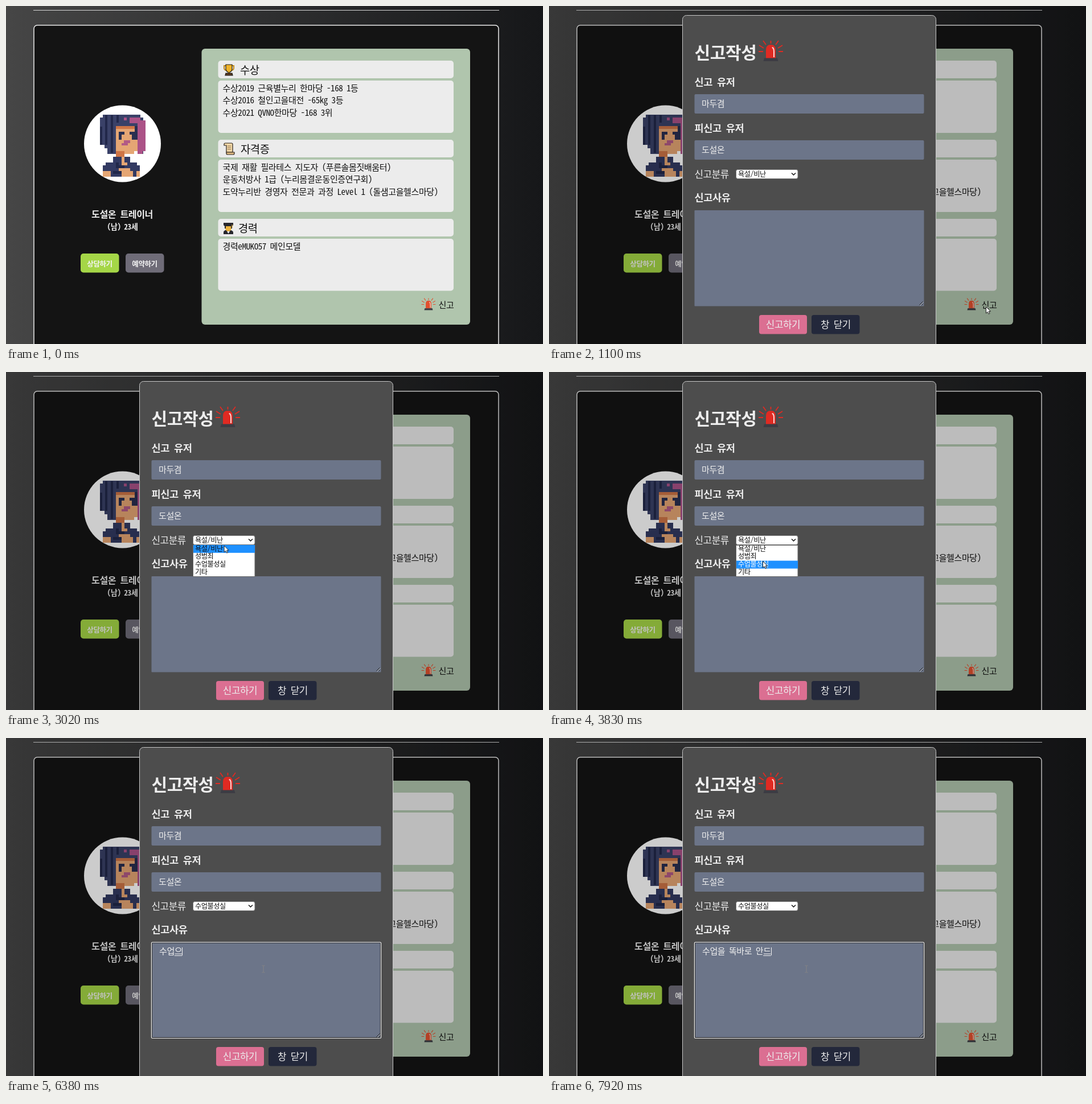
An HTML page that plays this animation: 943 px wide and 594 px high, repeating every 8000 ms.

```html
<!DOCTYPE html>
<html lang="ko">
<head>
<meta charset="utf-8">
<title>신고작성</title>
<style>
html, body { margin: 0; width: 100%; height: 100%; overflow: hidden; background: #222; }
#stage {
  position: relative; width: 943px; height: 594px; overflow: hidden;
  background: linear-gradient(to right, #464646, #161719);
  font-family: "Noto Sans Mono CJK KR", "Noto Sans CJK KR", "Noto Sans CJK JP", monospace;
  letter-spacing: -.027em; word-spacing: -.027em;
}
svg { position: absolute; left: 0; top: 0; }
text { white-space: pre; font-weight: 700; }
.head { font-size: 18.8px; fill: #111; }
.list { font-size: 15.05px; fill: #111; }
.head, .list text { font-weight: 500; }
.btn { font-size: 12.5px; fill: #f4f4f4; text-anchor: middle; }
.label { font-size: 17.6px; fill: #ededed; }
.big { font-size: 16.9px; fill: #ededed; font-weight: 500; }
.field { font-size: 15.05px; fill: #ededed; font-weight: 400; }
.opt { font-size: 12.2px; fill: #111; }
.opt, .opt text { font-weight: 500; }

/* 8 s loop: 1% = 80 ms */
.cut { animation: 8s step-end infinite; }
#modal { animation-name: modal; }
#report { animation-name: hover; }
#ring { animation-name: ring; }
#menu { animation-name: menu; }
#mark { animation-name: mark; }
#lazy { animation-name: lit; }
#pick1 { animation-name: first; }
#pick2 { animation-name: second; }
#focus { animation-name: focus; }
#arrow { animation-name: arrow; }
#hand { animation-name: hand; }
#beam { animation-name: beam; }
#caret { animation-name: blink; }
#pointer { animation: move 8s linear infinite; }

@keyframes modal { 0% { visibility: hidden } 13.75%, 100% { visibility: visible } }
@keyframes hover { 0% { opacity: 1 } 8.1% { opacity: .5 } 13.75%, 100% { opacity: 1 } }
@keyframes ring {
  0% { visibility: hidden } 12.125% { visibility: visible } 13.75% { visibility: hidden }
  32.6% { visibility: visible } 33.7% { visibility: hidden }
  51.25% { visibility: visible } 52.1% { visibility: hidden }
  56.1% { visibility: visible } 57%, 100% { visibility: hidden }
}
@keyframes menu { 0% { visibility: hidden } 34.375% { visibility: visible } 51.25%, 100% { visibility: hidden } }
@keyframes mark {
  0% { transform: translateY(0) } 39.5% { transform: translateY(13.8px) }
  46.2%, 100% { transform: translateY(27.6px) }
}
@keyframes lit { 0% { fill: #111 } 46.2%, 100% { fill: #fff } }
@keyframes first { 0% { opacity: 1 } 51.25%, 100% { opacity: 0 } }
@keyframes second { 0% { opacity: 0 } 51.25%, 100% { opacity: 1 } }
@keyframes focus { 0% { visibility: hidden } 56.125%, 100% { visibility: visible } }
@keyframes arrow {
  0% { visibility: hidden } 1.8% { visibility: visible } 8.1% { visibility: hidden }
  13.75% { visibility: visible } 54.2%, 100% { visibility: hidden }
}
@keyframes hand { 0% { visibility: hidden } 8.1% { visibility: visible } 13.75%, 100% { visibility: hidden } }
@keyframes beam { 0% { visibility: visible } 1.8% { visibility: hidden } 54.2%, 100% { visibility: visible } }
@keyframes blink {
  0% { visibility: hidden } 56.125% { visibility: visible } 62.375% { visibility: hidden }
  69%, 100% { visibility: visible }
}
@keyframes move {
  0%, .8% { transform: translate(389px, 307px); animation-timing-function: ease-in-out }
  8.75%, 16.2% { transform: translate(767px, 528px); animation-timing-function: ease-in-out }
  23.6% { transform: translate(343px, 241px) }
  25.9%, 26.6% { transform: translate(366px, 274px) }
  27.6%, 29.2% { transform: translate(380px, 306px) }
  32%, 34.2% { transform: translate(383px, 297px) }
  35.25%, 37.5% { transform: translate(383px, 303px) }
  40.4%, 44.3% { transform: translate(378px, 321px) }
  47.6%, 51.25% { transform: translate(375px, 332px); animation-timing-function: ease-in-out }
  56.1%, 100% { transform: translate(452px, 406px) }
}

#typed {
  position: absolute; left: 269px; top: 366px; line-height: 16px;
  font-size: 15.05px; color: #f0f0f0; white-space: pre;
}
#typed u { text-decoration: underline 1px; text-underline-offset: 2px; }
#caret { position: absolute; left: 100%; top: 2px; width: 1px; height: 14px; background: #f4f4f4; }
</style>
</head>
<body>
<div id="stage">
<svg width="943" height="594" viewBox="0 0 943 594">
  <defs>
    <symbol id="siren" viewBox="0 0 43 38" overflow="visible">
      <path d="M13 32V17Q13 8 21.500 8T30 17V32Z" fill="currentColor"/>
      <path d="M25 12q3 2 3 8v10h-2V20q0-5-3-7z" fill="#fff" opacity=".8"/>
      <path d="M10 31.500H33L34.500 37H8.500Z" fill="#3c3c44"/>
      <path d="M21.500 6V1M13 8 8 1M30 8l5-7M9 14 1 9M34 14l8-5M8 20H0M35 20h8" fill="none" stroke="currentColor" stroke-width="1.800"/>
    </symbol>
    <clipPath id="round"><circle cx="204.500" cy="242" r="67.500"/></clipPath>
  </defs>

  <path d="M48 7.500H866" stroke="#d6d6d6"/>
  <rect x="49" y="33.700" width="816" height="600" rx="6" fill="#141414" stroke="#ececec" stroke-width="1.500"/>

  <!-- profile -->
  <circle cx="204.500" cy="242" r="67.500" fill="#fff"/>
  <g clip-path="url(#round)" shape-rendering="crispEdges">
    <path d="M170 191H236V196H241V260H231V211H193V260H178V250H173V244H165V196H170Z" fill="#3a4168"/>
    <path d="M174 192h4v52h-4zM184 192h4v66h-4zM194 192h4v13h-4zM165 212h4v32h-4z" fill="#22284a"/>
    <path d="M193 211H231V255H225V260H208V270H193Z" fill="#e5a674"/>
    <path d="M193 211H226V216H193ZM193 255H208V265H193Z" fill="#cf7546"/>
    <path d="M207 196h5v5h-5zM217 196h19v5h9v54h-5v5h-9v-54h-14z" fill="#ab5287"/>
    <path d="M198 221h10v5h-5v9h-5zM217 221h9v-10h5v24h-10v-9h-4z" fill="#2a2f50"/>
    <path d="M207 236h11v5h-4v4h-11v-4h4z" fill="#b25a85"/>
    <path d="M188 265h15v5h5v-5h10v10h12v5h5v20h-65v-20h5v-5h13z" fill="#333a62"/>
    <path d="M203 265h5v10h5v5h-10zM170 290h14v10h-14zM198 285h20v5h5v10h-20v-5h-5zM229 290h6v10h-6z" fill="#e5a674"/>
    <path d="M193 275h5v5h10v5h-15zM188 290h15v5h-15z" fill="#22284a"/>
  </g>
  <text x="204" y="372" font-size="16.100" fill="#efefef" text-anchor="middle">도설온 트레이너</text>
  <text x="204.500" y="392.500" font-size="13.200" fill="#efefef" text-anchor="middle">(남) 23세</text>
  <rect x="131" y="435" width="67.500" height="33.500" rx="5" fill="#a5d647"/>
  <rect x="210" y="435" width="67.500" height="33.500" rx="5" fill="#6f6c78"/>
  <text class="btn" x="164.500" y="457.500">상담하기</text>
  <text class="btn" x="243.500" y="457.500">예약하기</text>

  <!-- record panel -->
  <rect x="343.500" y="75" width="471.500" height="485" rx="6" fill="#b0c5ad"/>
  <g fill="#ececec">
    <rect x="372.500" y="96" width="413.500" height="31" rx="5"/>
    <rect x="372.500" y="131" width="413.500" height="92" rx="5"/>
    <rect x="372.500" y="235" width="413.500" height="31" rx="5"/>
    <rect x="372.500" y="270" width="413.500" height="92" rx="5"/>
    <rect x="372.500" y="374" width="413.500" height="31" rx="5"/>
    <rect x="372.500" y="409" width="413.500" height="91.500" rx="5"/>
  </g>
  <g id="trophy" stroke="#1c1a18" stroke-width="1.200">
    <path d="M386 105h-3v4q0 4 5 4M397 105h3v4q0 4-5 4" fill="none" stroke="#c08a1c" stroke-width="2"/>
    <path d="M386 103h11v7q0 5-4 6v2h-3v-2q-4-1-4-6z" fill="#f0b429"/>
    <path d="M386 118h11l1 4h-13z" fill="#5a3a22"/>
  </g>
  <g id="scroll" stroke="#2a2119" stroke-width="1.200">
    <path d="M383 243q0-2 2-2h11q2 0 2 2v14h-11v-12h-4z" fill="#f2d9a8"/>
    <path d="M387 257h14v2q0 2-2 2h-10q-2 0-2-2z" fill="#e2bd84"/>
    <path d="M389 246h6M389 249h6M389 252h6" stroke="#8a6b48"/>
  </g>
  <g id="graduate">
    <path d="M382 401v-4q2-4 8-4t9 4v4z" fill="#26262c"/>
    <path d="M385 386h11v5q-1 5-5.500 5t-5.500-5z" fill="#eeb43c"/>
    <path d="M382 381h17v4l-2 2v4h-2v-4h-9v4h-2v-4l-2-2z" fill="#26262c"/>
    <path d="M388 396h5l-2.500 4z" fill="#eee"/>
    <path d="M397 384v6" stroke="#e0a82c"/>
  </g>
  <text class="head" x="411" y="120">수상</text>
  <text class="head" x="412" y="258.500">자격증</text>
  <text class="head" x="408" y="397.500">경력</text>
  <g class="list">
    <text x="380.500" y="149.500">수상2019 근육별누리 한마당 -168 1등</text>
    <text x="380.500" y="171">수상2016 철인고을대전 -65kg 3등</text>
    <text x="380.500" y="192.500">수상2021 QVNO한마당 -168 3위</text>
    <text x="380.500" y="288.500">국제 재활 필라테스 지도자 (푸른솔몸짓배움터)</text>
    <text x="380.500" y="310">운동처방사 1급 (누리몸결운동인증연구회)</text>
    <text x="380.500" y="331.500">도약누리반 경영자 전문과 과정 Level 1 (돌샘고을헬스마당)</text>
    <text x="380.500" y="428">경력eMUKO57 메인모델</text>
    <g id="report" class="cut"><text x="759.500" y="530.500">신고</text></g>
  </g>
  <use href="#siren" x="728" y="513" width="28" height="22" color="#e2502f"/>

  <!-- report dialog -->
  <g id="modal" class="cut">
    <rect width="943" height="594" fill="#000" opacity=".2"/>
    <rect x="234.500" y="16.500" width="445" height="620" rx="7" fill="#4d4d4d" stroke="#c8c8c8"/>
    <text x="255.500" y="92.500" font-size="30.100" fill="#ededed">신고작성</text>
    <use href="#siren" x="368" y="60" width="43" height="38" color="#e02a22"/>
    <text class="label" x="255.500" y="139.500">신고 유저</text>
    <text class="label" x="255.500" y="220.500">피신고 유저</text>
    <text class="big" x="255.500" y="302">신고분류</text>
    <text class="label" x="255.500" y="342.500">신고사유</text>
    <g fill="#6c7589">
      <rect x="255.500" y="155" width="403" height="34" rx="2"/>
      <rect x="255.500" y="236" width="403" height="34" rx="2"/>
      <rect x="255.500" y="359" width="403" height="168.500" rx="1"/>
    </g>
    <path d="M650.500 525.500l6-6M654.500 525.500l2-2" stroke="#1c1c1c"/>
    <path d="M651.500 526.500l6-6" stroke="#ddd" stroke-width=".700"/>
    <text class="field" x="268" y="176.500">마두겸</text>
    <text class="field" x="268" y="257.500">도설온</text>
    <rect x="328.500" y="287.500" width="108.500" height="16" rx="3" fill="#fff" stroke="#767676"/>
    <path d="M426 293.500l3.500 3.500 3.500-3.500" fill="none" stroke="#111" stroke-width="1.500"/>
    <g id="pick1" class="cut"><text class="opt" x="332" y="300">욕설/비난</text></g>
    <g id="pick2" class="cut"><text class="opt" x="332" y="300">수업불성실</text></g>

    <rect x="369" y="543" width="84" height="33.500" rx="4" fill="#db6f92"/>
    <rect x="461" y="543" width="84.500" height="33.500" rx="4" fill="#23283b"/>
    <text class="big" x="411" y="566" text-anchor="middle">신고하기</text>
    <text class="big" x="503.500" y="566" text-anchor="middle">창 닫기</text>

    <g id="focus" class="cut" fill="none">
      <rect x="256.500" y="360" width="401" height="166.500" stroke="#101010"/>
      <rect x="255.500" y="359" width="403" height="168.500" rx="1.500" stroke="#fff" stroke-width="1.200"/>
    </g>

    <g id="menu" class="cut">
      <rect x="328.500" y="304.500" width="108.500" height="55" fill="#fff" stroke="#6a6a6a"/>
      <rect id="mark" class="cut" x="329" y="304" width="108" height="13.800" fill="#1e90ff"/>
      <g class="opt">
        <text x="332" y="314.500">욕설/비난</text>
        <text x="332" y="328">성범죄</text>
        <text id="lazy" class="cut" x="332" y="342">수업불성실</text>
        <text x="332" y="355.500">기타</text>
      </g>
    </g>
  </g>

  <g id="pointer">
    <circle id="ring" class="cut" r="11" fill="#dfe03c" opacity=".8"/>
    <path id="arrow" class="cut" d="M.500.500V12L3.200 9.500 5 13.300 6.900 12.400 5.200 8.700H8.500Z" fill="#fff" stroke="#111" stroke-width=".900"/>
    <path id="hand" class="cut" d="M-1 1.500Q.500-.500 2 1.500V6.500L7 7.500Q8 8 7.500 10.500L6.500 16H-.500L-4.500 10Q-4 8-1 10.500Z" fill="#fff" stroke="#111" stroke-width=".900"/>
    <path id="beam" class="cut" d="M-2.500-6H-.500L0-5.500.500-6H2.500M0-5.500V5.500M-2.500 6H-.500L0 5.500.500 6H2.500" fill="none" stroke="#858585"/>
  </g>
</svg>
<div id="typed"><span id="done"></span><u id="live"></u><i id="caret" class="cut"></i></div>
</div>
<script>
const LOOP = 8000;
const $ = id => document.getElementById(id);

// Hangul keystrokes: [time, text after the key]
const keys = [
  [0, ''], [5520, 'ㅅ'], [5910, '수'], [6110, '숭'], [6180, '수어'], [6250, '수업'],
  [6320, '수업ㅇ'], [6380, '수업으'], [6450, '수업을'], [6720, '수업을 '],
  [6820, '수업을 ㄸ'], [6920, '수업을 또'], [7020, '수업을 똑'], [7120, '수업을 똑바'],
  [7220, '수업을 똑발'], [7320, '수업을 똑바로'], [7420, '수업을 똑바로 '],
  [7520, '수업을 똑바로 ㅇ'], [7590, '수업을 똑바로 아'], [7700, '수업을 똑바로 안'],
  [7810, '수업을 똑바로 안ㄷ'], [7920, '수업을 똑바로 안드']
];

let start, shown;
function draw(now) {
  start ??= now;
  const t = (now - start) % LOOP;
  const text = keys.findLast(k => k[0] <= t)[1];
  if (text !== shown) {
    shown = text;
    // the last syllable stays underlined until a space commits it
    const cut = text.endsWith(' ') ? text.length : Math.max(0, text.length - 1);
    $('done').textContent = text.slice(0, cut);
    $('live').textContent = text.slice(cut);
  }
  requestAnimationFrame(draw);
}
requestAnimationFrame(draw);
</script>
</body>
</html>
```
